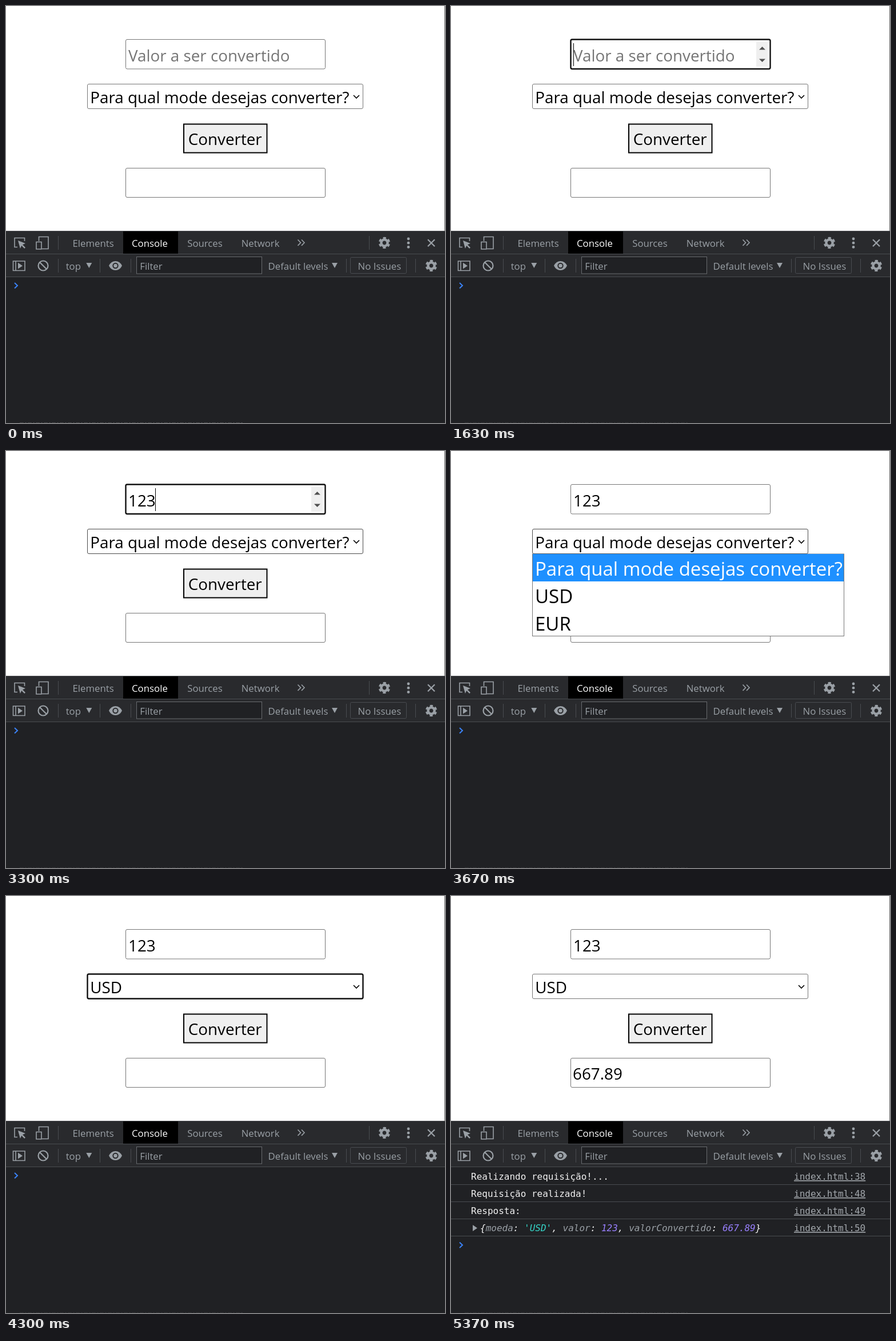
An HTML page for the animation above (8000 ms loop, 768x729 px).

```html
<!DOCTYPE html>
<html lang="pt">
<head>
<meta charset="utf-8">
<title>Conversor de moedas</title>
<style>
  html, body { margin: 0; width: 100%; height: 100%; overflow: hidden; background: #fff; }
  svg { display: block; width: 100vw; height: 100vh; }
  text { white-space: pre; }
  .form { font: 27.8px "Open Sans", "Noto Sans", sans-serif; fill: #000; }
  .option { font-size: 33px; }
  .tool { font: 16.8px "Open Sans", "Noto Sans", sans-serif; fill: #9aa0a6; }
  .log { font: 16px "DejaVu Sans Mono", monospace; fill: #f1f1f1; }
  .link { fill: #a3a8ad; text-decoration: underline; }
  .field { fill: #fff; stroke: #767676; }
  .hover { stroke: #4a4a4a; }
  .focus { stroke: #101010; stroke-width: 2.4; }
  .icon { fill: none; stroke: #9aa0a6; stroke-width: 1.6; }
  .solid { fill: #9aa0a6; }
  .rule { fill: none; stroke: #494c50; }
</style>
</head>
<body>
<svg viewBox="0 0 768 729" preserveAspectRatio="none">
  <defs>
    <g id="gear" fill="none" stroke="#9aa0a6">
      <circle r="5.6" stroke-width="4.4"/>
      <circle r="8.5" stroke-width="3.4" stroke-dasharray="4.9 4" stroke-dashoffset="2.45" transform="rotate(30)"/>
    </g>
    <path id="drop" class="solid" d="M-5-4.5H5L0 4.5Z"/>
  </defs>

  <rect width="768" height="394" fill="#fff"/>
  <path d="M767.5 0V393" stroke="#6b6b6b"/>

  <g class="form">
    <rect id="amount" class="field" x="209.5" y="58.5" width="349" height="51.5" rx="2.5"/>
    <g id="spinner">
      <rect x="534" y="63" width="20" height="43" fill="#efefef"/>
      <path d="M539 76.5l5.5-5.5 5.5 5.5ZM539 92.5l5.5 5.5 5.5-5.5Z" fill="#505050"/>
    </g>
    <text id="amountText" x="214" y="97"></text>
    <path id="caret" stroke="#000"/>

    <rect id="currency" class="field" x="142.5" y="136.5" width="482" height="43" rx="2.5"/>
    <text id="currencyText" x="147.3" y="170"></text>
    <path d="M608 156l5 5 5-5" fill="none" stroke="#000" stroke-width="1.6"/>

    <rect id="button" x="311" y="206.5" width="145.5" height="50" fill="#efefef" stroke="#000" stroke-width="2"/>
    <text x="318.7" y="243">Converter</text>

    <rect id="result" class="field" x="209.5" y="283.5" width="349" height="51" rx="2.5"/>
    <text id="resultText" x="213" y="321">667.89</text>

    <g id="popup">
      <rect class="field" x="142.5" y="180" width="545" height="143.5"/>
      <rect id="highlight" x="143" width="544" height="48" fill="#1e90ff"/>
      <text class="option" x="147" y="218">Para qual mode desejas converter?</text>
      <text class="option" x="147" y="266">USD</text>
      <text class="option" x="147" y="313.5">EUR</text>
    </g>
  </g>

  <rect y="393" width="768" height="336" fill="#202124"/>
  <rect y="393" width="768" height="80" fill="#292a2d"/>
  <rect x="205" y="394" width="96" height="40" fill="#000"/>
  <path class="rule" d="M0 393.5H768M0 433.5H768M0 473.5H768M91.5 402V426M635.5 402V426M91.5 442V466M164.5 442V466M218.5 442V466M595.5 442V466M716.5 442V466"/>

  <g class="tool">
    <text x="116.5" y="421">Elements</text>
    <text x="220" y="421" fill="#fff" style="fill:#fff">Console</text>
    <text x="317.2" y="421">Sources</text>
    <text x="411.7" y="421">Network</text>
    <text x="104.7" y="461">top</text>
    <rect x="228.5" y="438.5" width="219" height="29.5" fill="#202124" stroke="#686b6f"/>
    <text x="234.3" y="461">Filter</text>
    <text id="levels" x="458.5" y="461">Default levels</text>
    <rect class="rule" x="602.5" y="439.5" width="98" height="28" rx="2"/>
    <text x="615.6" y="461">No Issues</text>
  </g>

  <g class="icon">
    <path d="M20 421.5H15V405.5H32.5V411"/>
    <path class="solid" stroke="none" d="M21 410l13 5-5 2.3 5 5-1.8 1.8-5-5-2.3 5Z"/>
    <path d="M57.5 411V403.5H74V424.5H63M53 412.5H62V425H53Z"/>
    <path d="M510.5 408.5l5 5.2-5 5.2M517 408.5l5 5.2-5 5.2"/>
    <path d="M738 408.3l12 12M750 408.3l-12 12" stroke-width="2.3"/>
    <path d="M12.5 446H33V462.5H12.5ZM17 446V462.5"/>
    <path class="solid" stroke="none" d="M21 448.8l8 5.4-8 5.4Z"/>
    <circle cx="65" cy="454" r="8.5" stroke-width="2.2"/>
    <path d="M59 448l12 12" stroke-width="2.2"/>
    <path class="solid" stroke="none" d="M180 454Q184 446 191.5 446T203 454Q199 462 191.5 462T180 454Z"/>
    <circle cx="191.5" cy="454" r="4.2" stroke="#292a2d" stroke-width="2"/>
  </g>
  <g class="solid">
    <circle cx="704" cy="407" r="2.4"/>
    <circle cx="704" cy="414.2" r="2.4"/>
    <circle cx="704" cy="421.4" r="2.4"/>
  </g>
  <use href="#gear" x="662" y="414"/>
  <use href="#gear" x="744" y="454"/>
  <use href="#drop" x="145.3" y="453.5"/>
  <use href="#drop" x="575" y="453.5"/>

  <g id="log" class="log"></g>
  <path id="prompt" d="M15-4.5l5 4.7-5 4.7" fill="none" stroke="#3b82f6" stroke-width="2"/>
  <path id="edge" d="M24 728.5H415" stroke="#55575a" stroke-dasharray="7 2 3 2"/>
</svg>

<script>
const DURATION = 8000;
const QUESTION = 'Para qual mode desejas converter?';
const TYPED = [2600, 2770, 2970];
const LOG_TIMES = [5170, 5370, 5370, 5370];
const FADE_TIMES = [3530, 3570, 3630, 3670];

const $ = id => document.getElementById(id);
const show = (id, on) => { $(id).style.display = on ? '' : 'none'; };
const during = (t, from, to) => t >= from && t < to;
const countPast = (times, t) => times.filter(time => t >= time).length;

const span = (color, text) => `<tspan fill="${color}">${text}</tspan>`;
const key = text => span('#9aa0a6', text);
const number = text => span('#9980ff', text);
const preview = '{' + key('moeda') + ': ' + span('#35d4c7', "'USD'") + ', ' +
  key('valor') + ': ' + number(123) + ', ' + key('valorConvertido') + ': ' + number(667.89) + '}';

const messages = [
  ['Realizando requisição!...', 38],
  ['Requisição realizada!', 48],
  ['Resposta:', 49],
  [preview, 50],
];
$('log').innerHTML = messages.map(([text, line], i) => {
  const y = 496 + i * 30;
  const isObject = text === preview;
  return `<g>
    ${isObject ? `<path class="solid" d="M38 ${y - 11}l8 5.5-8 5.5Z"/>` : ''}
    <text x="${isObject ? 51 : 35}" y="${y}" ${isObject ? 'font-style="italic"' : ''}>${text}</text>
    <text class="link" x="600" y="${y}">index.html:${line}</text>
    <path class="rule" d="M0 ${y + 8.5}H768"/>
  </g>`;
}).join('');
const rows = [...$('log').children];
const options = document.querySelectorAll('.option');

function fieldState(id, focused, hovered) {
  $(id).setAttribute('class', 'field' + (focused ? ' focus' : hovered ? ' hover' : ''));
}

function render(t) {
  // Pointer passes upward over each control
  $('levels').style.fill = during(t, 870, 900) ? '#fff' : '';
  fieldState('result', false, during(t, 970, 1030));
  $('button').setAttribute('fill', during(t, 1030, 1100) ? '#e5e5e5' : '#efefef');

  const digits = countPast(TYPED, t);
  const amountFocused = during(t, 1630, 3530);
  fieldState('amount', amountFocused, during(t, 1370, 1630));
  show('spinner', during(t, 1370, 3530));
  $('amountText').textContent = digits ? '123'.slice(0, digits) : 'Valor a ser convertido';
  $('amountText').style.fill = digits ? '' : '#757575';
  $('caret').setAttribute('d', `M${214.5 + Math.round(digits * 15.8)} 65V105`);
  show('caret', amountFocused && !during(t, 2170, 2600));

  const chosen = t >= 4300;
  fieldState('currency', during(t, 4300, 4530), during(t, 1170, 1270) || during(t, 3300, 4300));
  $('currencyText').textContent = chosen ? 'USD' : QUESTION;

  const active = t >= 4000 ? 1 : 0;
  $('popup').style.opacity = countPast(FADE_TIMES, t) / FADE_TIMES.length;
  show('popup', during(t, 3530, 4300));
  $('highlight').setAttribute('y', 180 + active * 48);
  options.forEach((option, i) => { option.style.fill = i === active ? '#fff' : ''; });

  const logged = countPast(LOG_TIMES, t);
  rows.forEach((row, i) => { row.style.display = i < logged ? '' : 'none'; });
  $('prompt').setAttribute('transform', `translate(0 ${488.5 + logged * 30.4})`);
  show('resultText', t >= 5370);
  $('edge').style.opacity = t < 1630 ? 0.7 : 0.35;
}

const start = performance.now();
function tick() {
  render((performance.now() - start) % DURATION);
  requestAnimationFrame(tick);
}
tick();
</script>
</body>
</html>
```
